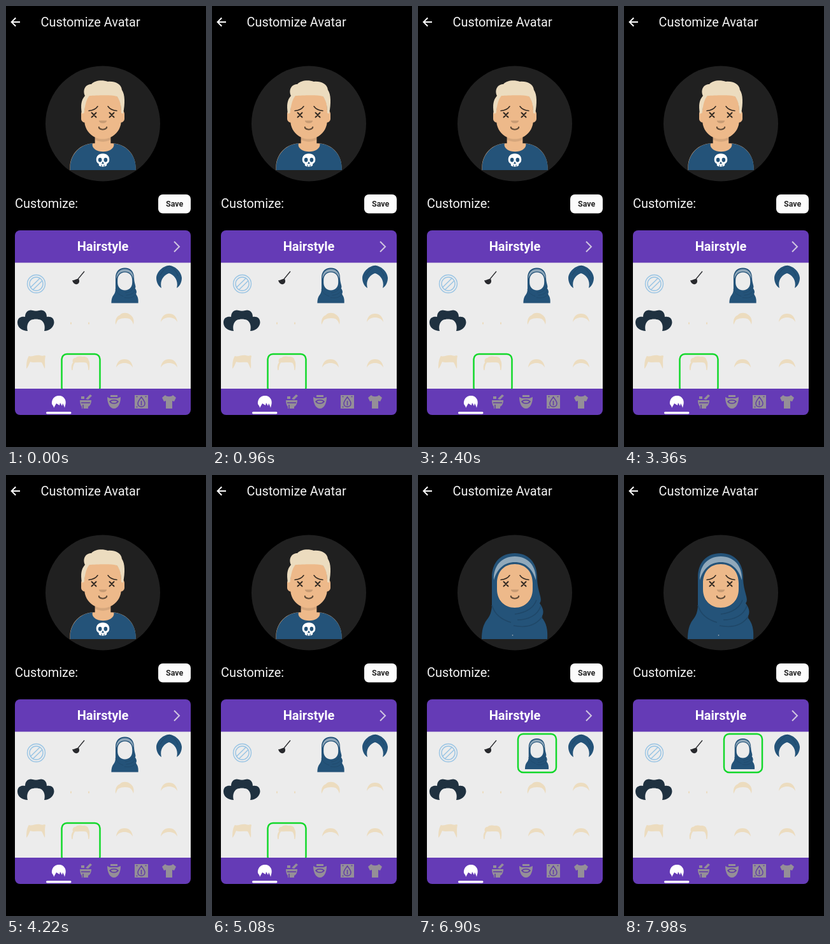
These frames come from a looping animation (314x688 px, 8000 ms). An HTML page:

```html
<!DOCTYPE html>
<html lang="en">
<head>
<meta charset="utf-8">
<title>Customize Avatar</title>
<style>
html, body { margin: 0; width: 100%; height: 100%; overflow: hidden; background: #000; }
svg { display: block; width: 100%; height: 100%; font-family: Roboto, sans-serif; }
</style>
</head>
<body>
<svg viewBox="0 0 314 688">
  <defs>
    <clipPath id="panelClip"><rect x="14" y="350" width="276" height="288" rx="8"/></clipPath>
    <clipPath id="gridClip"><rect x="14" y="400" width="276" height="197"/></clipPath>
    <path id="skin" d="M124 144.600V163H128C167.800 163 200 195.200 200 235V244H0V235C0 195.200 32.200 163 72 163H76V144.600C58.800 136.400 46.400 119.700 44.300 99.900C38.500 99 34 94 34 88V74C34 68 38.300 63.200 44 62.200V56C44 25 69 0 100 0C131 0 156 25 156 56V62.200C161.700 63.200 166 68 166 74V88C166 94 161.500 99 155.700 99.900C153.600 119.700 141.200 136.400 124 144.600Z"/>
    <clipPath id="skinClip"><use href="#skin"/></clipPath>
    <path id="hairShape" d="M119 168C117 154 118 147 124 140C120 132 124 122 134 122C139 116 151 115 160 118C170 117 181 121 182 131C187 138 187 152 184 168L181 167C181 155 179 147 174 141C162 138 141 140 131 140C125 147 124 157 122.500 167Z"/>
    <path id="arc" d="M-13 6C-12-3-7-7 0-7C7-7 12-3 13 6C10 1 6-1 0-1C-6-1-10 1-13 6Z"/>
    <g id="scarf">
      <path fill="#245379" fill-rule="evenodd" d="M152 122C130 122 116 136 116 160V202C116 213 113 220 108 226C102 234 100 244 100 256H203C204 242 202 231 194 222C199 214 196 207 191 200C197 194 187 182 187 160C187 136 173 122 152 122ZM152 139C169 139 180 151 180 169V178C180 195 169 207 152 207C135 207 124 195 124 178V169C124 151 135 139 152 139Z"/>
      <path fill="#91a9bb" d="M119 164C118 142 131 127 152 127C173 127 186 142 185 164C179 145 168 136 152 136C136 136 125 145 119 164Z"/>
      <path d="M186 195C181 209 168 215 152 217M193 204C188 219 173 226 156 226M195 221C185 235 170 239 150 235M116 203C120 217 132 226 146 230" fill="none" stroke="#1f4768" stroke-width="1.600"/>
    </g>
  </defs>

  <rect width="314" height="688"/>
  <path d="M22 25H9M15.200 18.500L8.700 25L15.200 31.500" fill="none" stroke="#fff" stroke-width="2"/>
  <g fill="#f4f4f4" font-size="19.900">
    <text x="54.500" y="31.500">Customize Avatar</text>
    <text x="14" y="315">Customize:</text>
  </g>
  <rect x="239" y="294" width="51" height="29.500" rx="7" fill="#fcfcfc"/>
  <text x="264.700" y="313" font-size="12.500" font-weight="700" text-anchor="middle" fill="#262626">Save</text>

  <circle cx="152" cy="183.500" r="90" fill="#202020"/>
  <g transform="translate(152 256) scale(.515) translate(-132 -280)">
    <g transform="translate(32 36)">
      <use id="body" href="#skin" fill="#edb98a"/>
      <path clip-path="url(#skinClip)" fill="#000" opacity=".1" d="M156 79V102C156 133 131 158 100 158C69 158 44 133 44 102V79V94C44 125 69 150 100 150C131 150 156 125 156 94Z"/>
    </g>
    <g id="shirt" transform="translate(0 170)">
      <path fill="#245379" d="M133 54C151 54 165.800 44.900 165.800 33.700C165.800 32.100 165.500 30.600 165 29.200C202.800 32.100 232.500 63.700 232.500 102.300V110H32.500V102.300C32.500 63.300 62.800 31.500 101.200 29.100C100.500 30.600 100.100 32.100 100.100 33.700C100.100 44.900 114.800 54 133 54Z"/>
      <path fill="#fff" d="M132 60C119 60 112 68 112 78C112 85 115 89 120 91V96C124 101 140 101 144 96V91C149 89 152 85 152 78C152 68 145 60 132 60Z"/>
      <g fill="#245379">
        <ellipse cx="123.500" cy="79" rx="5.500" ry="6.500"/><ellipse cx="140.500" cy="79" rx="5.500" ry="6.500"/>
        <path d="M132 84L136 91H128ZM127 94h2v6h-2zM135 94h2v6h-2z"/>
      </g>
    </g>
    <path transform="translate(104 122)" fill="#000" opacity=".16" d="M16 8C16 12.400 21.400 16 28 16C34.600 16 40 12.400 40 8Z"/>
    <path transform="translate(78 134)" fill="#000" opacity=".6" d="M40 16C40 21.400 46 25 54 25C61 25 68 21.400 68 16C68 14.900 67 14 66 14C64.700 14 64 14.900 64 16C62.900 18.600 59.400 20.900 54 21C48.600 20.900 45 18.600 44 16C44 14.900 43 14 42 14C41 14 40 14.900 40 16Z"/>
  </g>
  <g fill="none" stroke="#332a22" stroke-width="1.700" stroke-linecap="round">
    <path d="M130 163.500C136 163 141 161 144 156.500M174 163.500C168 163 163 161 160 156.500" stroke-width="1.500"/>
    <path d="M134.500 166.500L141.500 173.500M141.500 166.500L134.500 173.500M162.500 166.500L169.500 173.500M169.500 166.500L162.500 173.500" stroke-width="2"/>
  </g>
  <use id="hair" href="#hairShape" fill="#ecdcbf"/>
  <g id="hijab">
    <use href="#scarf"/>
    <circle cx="148.500" cy="250" r=".8" fill="#c8c8c8"/>
  </g>

  <g clip-path="url(#panelClip)">
    <rect x="14" y="350" width="276" height="288" fill="#653bb6"/>
    <rect x="14" y="400.500" width="276" height="196.500" fill="#ececec"/>
  </g>
  <text x="152" y="382" font-size="20" font-weight="700" text-anchor="middle" fill="#fff">Hairstyle</text>
  <path d="M264 367.500L272 375.500L264 383.500" fill="none" stroke="#d0c6e0" stroke-width="2"/>

  <g clip-path="url(#gridClip)">
    <g fill="none" stroke="#98c4e4" stroke-width="1.400">
      <circle cx="47.500" cy="433.500" r="14"/><circle cx="47.500" cy="433.500" r="10.500"/>
      <path d="M38.500 439L53 425M42 443L56.500 429"/>
    </g>
    <path d="M104 428C108 428 111 425 114 425.500C117 431 113 435 109 434C106 433 105 431 104 428Z" fill="#28292d"/>
    <path d="M113 426L123 414" stroke="#28292d" stroke-width="1.300"/>
    <use id="scarfIcon" href="#scarf"/>
    <path d="M256 405C264 405 275 413 276 424C276 431 273 437 268 440C271 429 265 420 256 417C247 420 241 429 244 440C239 437 236 431 236 424C237 413 248 405 256 405Z" fill="#245379"/>
    <path d="M256 405C252 409 247 411 242 420M256 405C262 408 267 413 270 421" fill="none" stroke="#1f4768"/>
    <path d="M18 494C18 486 24 484 30 485C30 477 36 473 42 475C45 476 49 476 52 475C58 473 64 477 64 485C71 484 75.500 487 75.500 494C75 501 68 507 60 507C62 500 60 493 55 490C50 488 44 488 39 490C34 493 32 500 34 507C26 507 18 502 18 494Z" fill="#1f3140"/>
    <g fill="#ecdcbf">
      <path d="M101 493.500h2v3h-2zM129 493.500h2v3h-2z"/>
      <path d="M172 497C171 489 174 484 179 482C182 478 190 478 194 481C199 484 202 489 200 497C199 493 197 490 194 488C188 486 181 487 177 489C174 491 174 494 172 497Z"/>
      <use href="#arc" x="256" y="487"/>
      <path d="M32 566C32 556 33 550 36 546C41 548 46 544 53 545C58 547 61 544 62 546C60 554 62 558 61 566C59 563 58 559 56 556C50 555 43 557 38 555C36 559 35 563 32 566Z"/>
      <use href="#hairShape" transform="translate(117 557) scale(.42) translate(-152 -141.500)"/>
      <use href="#arc" x="186" y="558"/>
      <use href="#arc" x="256" y="558"/>
    </g>
    <rect id="pick" width="60" height="60" rx="8" fill="none" stroke="#12d82a" stroke-width="2.500"/>
  </g>

  <path d="M72 621C71 613 77 607 84 608C90 608 95 614 93.500 621L92 627C91.500 624 90 622 89 620L88 624L85 619L84 623L79 620L75 627C75 624 73 623 72 621Z" fill="#fff"/>
  <rect x="63" y="633" width="39.500" height="3.500" rx="1.700" fill="#fff"/>
  <g fill="#958f98">
    <path d="M116 615H134C134 620 132 624 129 625V628H119V625C117 623 116 619 116 615ZM125 613L132 606L135 608L129 614ZM118 609h5v4h-5z"/>
    <path d="M159 610L163 612H175L180 610C180 620 176 628 169.500 628C163 628 159 620 159 610ZM164 607h11v3h-11z"/>
    <path d="M202 607h21v21h-21z"/>
    <path d="M250 607C252 610 260 610 262 607L267 611L264 617L261 616V628H251V616L248 617L245 611Z"/>
  </g>
  <g fill="none" stroke="#5f3aa6" stroke-width="1.500">
    <path d="M163 617C166 614 173 614 176 617C173 621 166 621 163 617ZM118 619H132M121 622V628"/>
    <path d="M212.500 610C209 615 207 617 207 620C207 627 218 627 218 620C218 617 216 615 212.500 610ZM212.500 616V623M204.500 609.500h2M204.500 625.500h2M218.500 609.500h2"/>
  </g>
</svg>
<script>
const LOOP = 8000, SWITCH = 6300;
const el = id => document.getElementById(id);
const set = (id, attrs) => {
  for (const key in attrs) el(id).setAttribute(key, attrs[key]);
};
const show = (id, on) => set(id, { visibility: on ? 'visible' : 'hidden' });

function draw(t) {
  const worn = t >= SWITCH;
  show('shirt', !worn);
  show('hair', !worn);
  show('hijab', worn);
  set('scarfIcon', {
    transform: `translate(186.5 ${worn ? 435 : 436}) scale(${worn ? 0.36 : 0.41}) translate(-151.5 -189)`
  });
  set('body', { 'clip-path': worn ? 'inset(0 0 94px 0)' : 'none' });
  set('pick', worn ? { x: 157, y: 404 } : { x: 87.5, y: 543 });
}

function tick(now) {
  draw(now % LOOP);
  requestAnimationFrame(tick);
}
draw(0);
requestAnimationFrame(tick);
</script>
</body>
</html>
```
